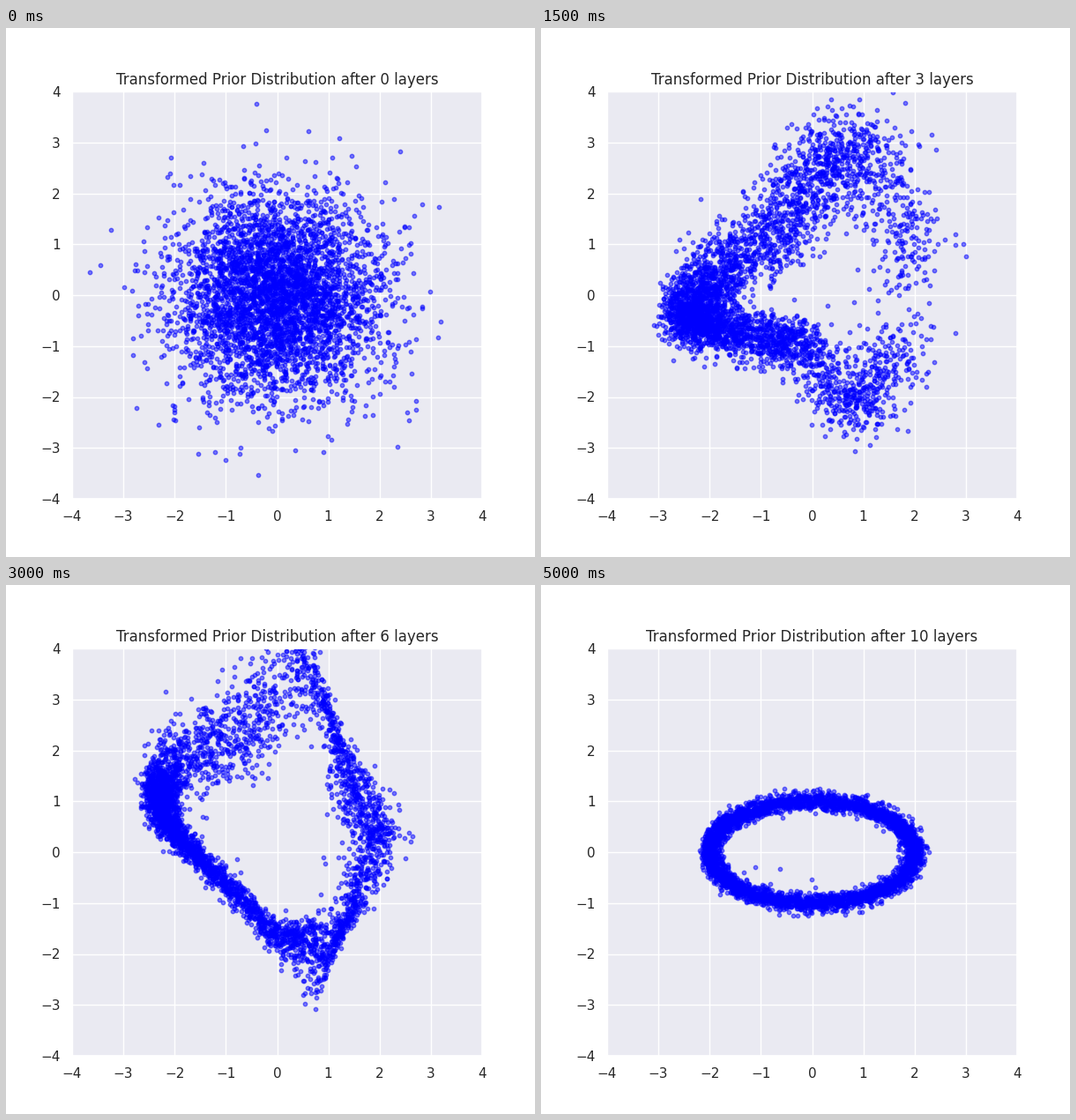
A matplotlib script that plays this animation: 600x600 px, repeating every 5500 ms.

```python
import numpy as np
import matplotlib.pyplot as plt
from matplotlib.animation import FuncAnimation

N = 4100
LAYERS = 10
INTERVAL = 500

plt.rcParams.update({
    "font.family": "DejaVu Sans",
    "text.color": "0.15",
    "axes.facecolor": "#EAEAF2",
    "axes.edgecolor": "white",
    "axes.linewidth": 1.25,
    "axes.axisbelow": True,
    "axes.grid": True,
    "axes.titlesize": 12,
    "grid.color": "white",
    "grid.linewidth": 1,
    "xtick.labelsize": 11,
    "ytick.labelsize": 11,
    "xtick.major.size": 6,
    "ytick.major.size": 6,
    "xtick.bottom": False,
    "ytick.left": False,
    "xtick.labelcolor": "0.15",
    "ytick.labelcolor": "0.15",
})

rng = np.random.default_rng(7)


def fall(v, centre, rate):
    """Smooth step from 1 down to 0."""
    return 1 / (1 + np.exp(rate * (v - centre)))


def bump(v, centre, width):
    return np.exp(-((v - centre) / width) ** 2)


def spline(s, keys):
    """Smooth curve through evenly spaced key points, s in 0..1."""
    keys = np.array(keys, float)
    slope = np.gradient(keys, axis=0)
    t = s * (len(keys) - 1)
    i = np.minimum(t.astype(int), len(keys) - 2)
    f = (t - i)[:, None]
    ease = f * f * (3 - 2 * f)
    curve = (keys[i] * (1 - ease) + keys[i + 1] * ease
             + slope[i] * f * (1 - f) ** 2 - slope[i + 1] * f * f * (1 - f))
    return curve.T


def strand(s, keys, base, spread):
    """Noisy strand, widest on the upper branch, tightest on the lower one."""
    width = base + spread * np.cos(np.pi * (s - .15)) ** 2
    x, y = spline(s, keys) + width * noise
    return x, y + lift


# Layer 1: x is scaled and shifted by functions of y
x0, y0 = rng.standard_normal((2, N))
scale = .4 + .72 * fall(y0, .6, 5)
shift = (-.9 * fall(y0, .2, 6) - 1.15 * bump(y0, -.25, .55)
         - .15 * np.maximum(y0, 0))
x1 = x0 * scale + shift

# Position round the ring: rank by angle about the notch
angle = np.arctan2(y0 + .25, x1 - .1) % (2 * np.pi)
u = (np.argsort(np.argsort(angle)) + .5) / N
theta = 2 * np.pi * u
dense = u + .5 * np.sin(theta) / (2 * np.pi)  # crowds points towards the left

noise = rng.standard_normal((2, N))
stray = (u > .55) & (u < .9) & (rng.random(N) < .008)
lift = stray * rng.uniform(.4, .8, N)

x3, y3 = strand(dense, [
    (2, .35), (1.1, 2.7), (.15, 2.6), (-.4, 1.5), (-1.6, .6), (-2.4, -.3),
    (-2, -.6), (-.95, -.85), (-.15, -1), (.85, -2.2), (1.7, -.8),
], .24, .2)

x5, y5 = strand(dense, [
    (1.95, 0), (1.55, 2.2), (.95, 3.8), (-.5, 1.7), (-2, .35), (-2.3, -.25),
    (-1.6, -.66), (-.45, -.85), (.5, -1.3), (1.25, -3), (1.8, -.4),
], .1, .2)

x8, y8 = strand(u, [
    (2.2, -.4), (1.2, 1.2), (.8, 2.35), (-.3, 2.05), (-1.6, .85), (-2.45, .5),
    (-1.7, -.3), (-.6, -1.3), (.7, -1.25), (1.65, -.7), (2.45, -.75),
], .11, .09)

x10, y10 = np.array([2 * np.cos(theta), np.sin(theta)]) + .09 * noise
y10 = y10 + lift

# Layer 6: y is scaled and shifted by functions of x
y6 = (y5 * (.35 + 1.1 * fall(x5, .8, 3.2))
      + .1 + 1.3 * fall(x5, -1.35, 2.2) - .45 * bump(x5, .1, .7))

# Odd layers move x only, even layers move y only
xs = [x0, x1, x3, x5, x8, x10]
ys = [y0, y3, y5, y6, y8, y10]

fig, ax = plt.subplots(figsize=(6, 6), dpi=100)
dots = ax.scatter(x0, y0, s=10, color="blue", alpha=0.5)
ax.set(xlim=(-4, 4), ylim=(-4, 4), xticks=range(-4, 5), yticks=range(-4, 5))
title = ax.set_title("")


def update(layer):
    dots.set_offsets(np.column_stack([xs[(layer + 1) // 2], ys[layer // 2]]))
    title.set_text(f"Transformed Prior Distribution after {layer} layers")
    return dots, title


anim = FuncAnimation(fig, update, frames=LAYERS + 1, interval=INTERVAL,
                     repeat=True, repeat_delay=0)
plt.show()
```
